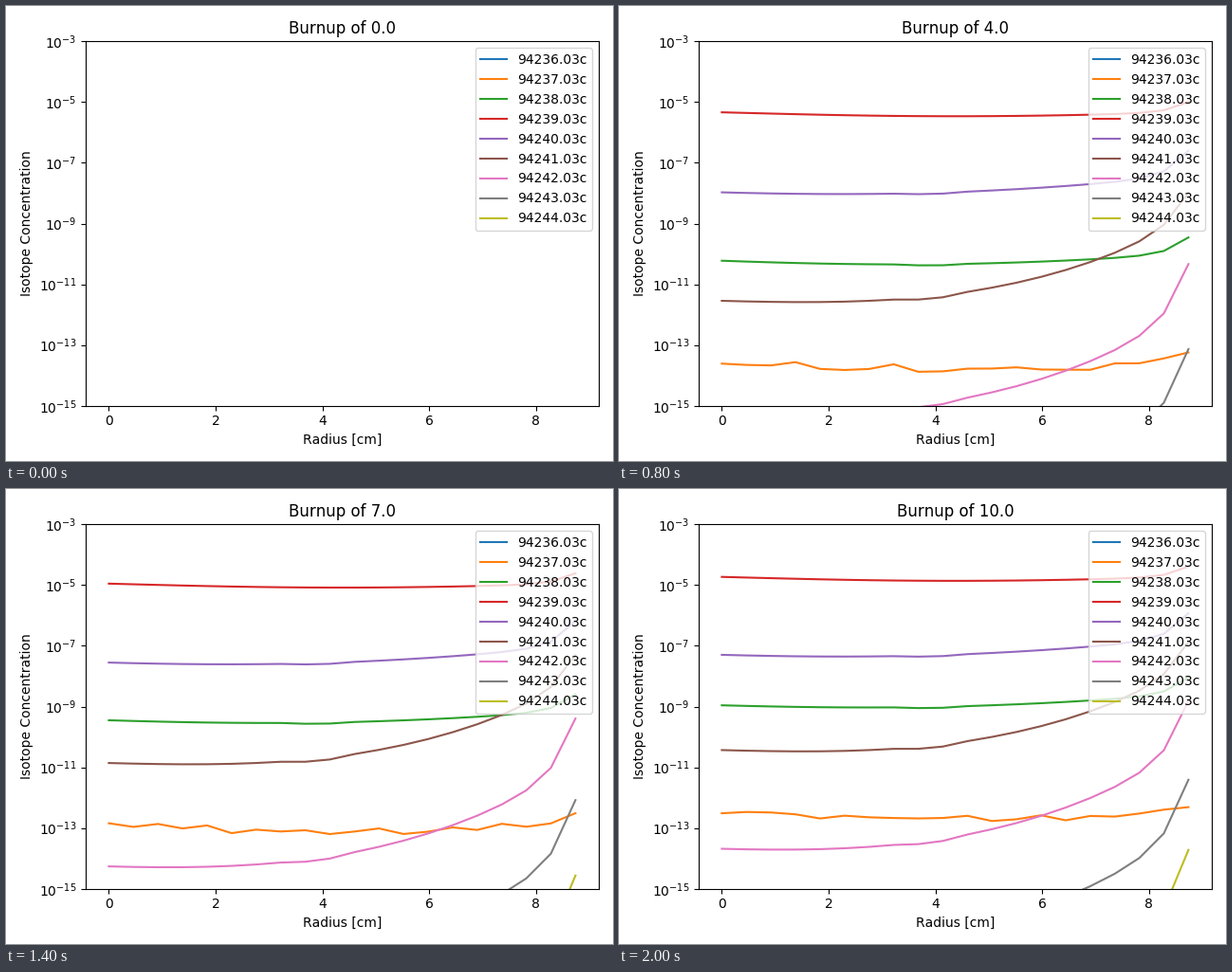
Recreate the animation shown at these times as a matplotlib script. Size 640 by 480 pixels, loop 2100 ms.

```python
import numpy as np
import matplotlib.pyplot as plt
from matplotlib.animation import FuncAnimation

plt.rcParams["text.kerning_factor"] = 6

FRAMES, INTERVAL, STEP = 21, 100, 0.5
radius = 0.46 * np.arange(20)
u = radius / radius[-1]

# isotope: parent, growth of log10(level) in log10(burnup),
#          then the radial gain over the parent in decades:
#          dip, bulk, bulk power, rim, notch
ISOTOPES = {
    237: (None, (-0.40, 3.30, -15.34), (0.30, 0.00, 2.0, 0.25, 0.00)),
    239: (None, (-0.36, 2.10, -6.469), (0.13, 0.00, 2.0, 0.34, 0.00)),
    238: (239, (0.00, 3.18, -12.138), (0.00, 0.38, 2.0, 0.19, 0.05)),
    240: (239, (-0.22, 2.05, -9.126), (0.00, 0.56, 2.0, 0.47, 0.05)),
    241: (240, (-0.18, 3.08, -13.333), (0.00, 2.14, 3.2, 0.05, 0.05)),
    242: (241, (-0.30, 4.30, -17.683), (0.00, 0.63, 2.0, 0.68, 0.00)),
    243: (242, (0.00, 4.33, -21.230), (0.00, 0.50, 2.0, 0.12, 0.00)),
    244: (243, (0.00, 5.45, -25.340), (0.00, 0.50, 2.0, 0.18, 0.00)),
}


def profile(iso):
    """Radial shape: the parent's shape plus one capture step."""
    parent, _, (dip, bulk, power, rim, notch) = ISOTOPES[iso]
    gain = (bulk * u**power + rim * u**25 - dip * np.sin(np.pi * u)
            - notch * np.exp(-((u - 0.45) / 0.045) ** 2))
    return gain if parent is None else profile(parent) + gain


def concentration(iso, burnup):
    age = np.log10(burnup)
    level = np.polyval(ISOTOPES[iso][1], age) + profile(iso)
    if iso == 238:  # flatter towards the rim early on
        level -= 0.36 * u * (1 - age)
    if iso == 237:  # rare isotope, so counting noise shows
        rng = np.random.default_rng(int(burnup * 10))
        level += rng.normal(0, 0.2 / np.sqrt(burnup), u.size)
    return 10.0**level


fig, ax = plt.subplots(figsize=(6.4, 4.8), dpi=100)
lines = {iso: ax.plot([], [], label=f"94{iso}.03c")[0]
         for iso in range(236, 245)}

ax.set_yscale("log")
ax.set_ylim(1e-15, 1e-3)
ax.set_yticks(10.0 ** np.arange(-15, -2, 2))
ax.minorticks_off()
margin = 0.05 * radius[-1]
ax.set_xlim(-margin, radius[-1] + margin)
ax.set_xlabel("Radius [cm]")
ax.set_ylabel("Isotope Concentration")
title = ax.set_title("Burnup of 0.0")
ax.legend(loc="upper right")
fig.tight_layout()


def update(frame):
    burnup = frame * STEP
    title.set_text(f"Burnup of {burnup}")
    for iso, line in lines.items():
        if burnup > 0 and iso in ISOTOPES:
            line.set_data(radius, concentration(iso, burnup))
        else:
            line.set_data([], [])
    return [title, *lines.values()]


anim = FuncAnimation(fig, update, frames=FRAMES, interval=INTERVAL,
                     repeat=True, repeat_delay=0, blit=False)
plt.show()
```
